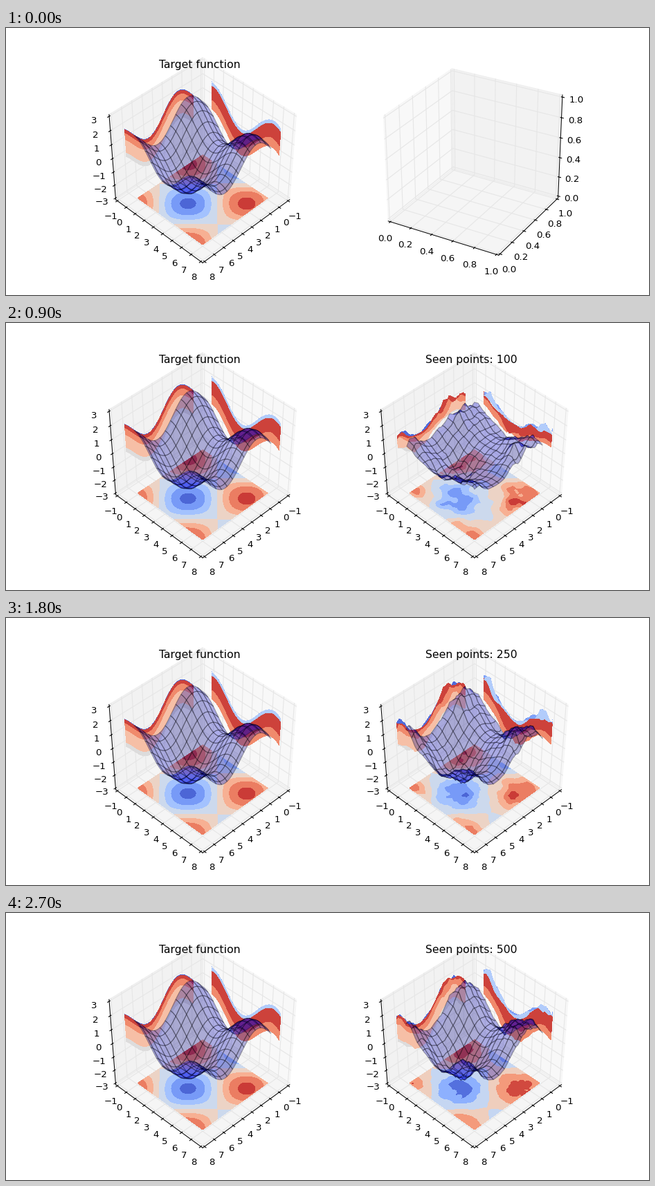
A matplotlib script for the animation above (3900 ms loop, 929 by 387 pixels).

```python
import numpy as np
import matplotlib.pyplot as plt
from matplotlib.animation import FuncAnimation
from matplotlib.collections import PolyCollection
from matplotlib.ticker import MaxNLocator

W, H, DPI = 929, 387, 80
plt.rcParams["font.family"] = "DejaVu Sans"
CMAP = plt.get_cmap("coolwarm")
LEVELS = MaxNLocator(7, steps=[1, 1.5, 2, 2.5, 3, 4, 5, 6, 8, 10])
ALPHA = 0.3
PAD = 0.5 + 1 / 48          # half size of the drawn box
DELTA = 1 / 12
AX_W, AX_H = W * 0.775 / 2.2, H * 0.8
COUNTS = [0, 50, 100, 150, 200, 250, 300, 400, 500]
SIDE, SIZE, STRIDE = 7, 100, 8

axis_pts = np.linspace(0, SIDE, SIZE)
X, Y = np.meshgrid(axis_pts, axis_pts)


class View:
    """Perspective view of a box, projected to stage pixels."""

    def __init__(self, column, lo, hi, ticks, fmt, elev, azim):
        self.left = W * 0.125 + column * AX_W * 1.2
        self.lo, self.hi = np.array(lo, float), np.array(hi, float)
        self.ticks, self.fmt = ticks, fmt
        e, a = np.radians([elev, azim])
        self.n = np.array([np.cos(e) * np.cos(a), np.cos(e) * np.sin(a), np.sin(e)])
        self.u = np.array([-np.sin(a), np.cos(a), 0])
        self.v = np.cross(self.n, self.u)

    def screen(self, q):
        q = np.asarray(q, float)
        depth = 10 - q @ self.n
        sx = self.left + (q @ self.u / depth + 0.095) / 0.185 * AX_W
        sy = H * 0.9 - (q @ self.v / depth + 0.095) / 0.185 * AX_H
        return sx, sy, depth

    def unit(self, x, y, z):
        p = np.stack(np.broadcast_arrays(x, y, z), axis=-1)
        return (p - self.lo) / (self.hi - self.lo) - 0.5

    def project(self, x, y, z):
        return self.screen(self.unit(x, y, z))


def space(lo, hi):
    return np.linspace(lo, hi, int(round(hi - lo)) + 1)


def main_view(column):
    ticks = [space(-1, 8), space(-1, 8), space(-3, 3)]
    return View(column, (-1, -1, -3), (8, 8, 3), ticks, "{:g}", 45, 45)


def empty_view():
    ticks = [np.linspace(0, 1, 6)] * 3
    return View(1, (0, 0, 0), (1, 1, 1), ticks, "{:.1f}", 30, -60)


def put(p, i, value):
    q = np.array(p, float)
    q[i] = value
    return q


def draw_box(ax, view):
    back = -np.sign(view.n) * PAD
    for i, gray in enumerate((0.95, 0.90, 0.925)):
        j, k = [m for m in range(3) if m != i]
        corners = []
        for a, b in ((-1, -1), (1, -1), (1, 1), (-1, 1)):
            corners.append(put(put(back, j, a * PAD), k, b * PAD))
        sx, sy, _ = view.screen(corners)
        ax.fill(sx, sy, fc=(gray,) * 3 + (0.5,), ec=(gray,) * 3 + (0.5,), lw=1, zorder=0)

    for i, (flip, tick_dir) in enumerate(((1, 1), (0, 0), (0, 0))):
        edge = put(back, flip, -back[flip])
        sx, sy, _ = view.screen([put(edge, i, -PAD), put(edge, i, PAD)])
        ax.plot(sx, sy, color="k", lw=0.9, zorder=1.5)
        out = np.sign(edge[tick_dir])
        for t in view.ticks[i]:
            pos = (t - view.lo[i]) / (view.hi[i] - view.lo[i]) - 0.5
            g = put(back, i, pos)
            j, k = (i - 2) % 3, (i - 1) % 3
            sx, sy, _ = view.screen([put(g, j, -back[j]), g, put(g, k, -back[k])])
            ax.plot(sx, sy, color="0.9", lw=1, zorder=1)

            p = put(edge, i, pos)
            ends = [put(p, tick_dir, p[tick_dir] + out * s * DELTA) for s in (-0.1, 0.2)]
            sx, sy, _ = view.screen(ends)
            ax.plot(sx, sy, color="k", lw=1, zorder=1.6)

            label = put(p + np.sign(p) * DELTA, i, pos)
            sx, sy, _ = view.screen(label)
            text = view.fmt.format(t + 0.0).replace("-", "\u2212")
            ax.text(sx, sy, text, size=12, ha="center", va="top", zorder=4)


def cell_ring(r, c):
    """Grid indices around one patch, counter-clockwise."""
    r1, c1 = min(r + STRIDE, SIZE - 1), min(c + STRIDE, SIZE - 1)
    ring = [(r, j) for j in range(c, c1)] + [(i, c1) for i in range(r, r1)]
    ring += [(r1, j) for j in range(c1, c, -1)] + [(i, c) for i in range(r1, r, -1)]
    return tuple(np.array(ring).T)


def draw_surface(ax, view, z):
    polys, normals, depths = [], [], []
    px, py, depth = view.project(X, Y, z)
    starts = range(0, SIZE - 1, STRIDE)
    for r in starts:
        for c in starts:
            at = cell_ring(r, c)
            polys.append(np.column_stack([px[at], py[at]]))
            depths.append(depth[at].mean())
            ring = np.column_stack([X[at], Y[at], z[at]])
            a, b, d = ring[0], ring[len(ring) // 3], ring[2 * len(ring) // 3]
            nv = np.cross(a - b, b - d)
            normals.append(nv / np.linalg.norm(nv))
    shade = np.array(normals) @ [-1, -1, 0.5]
    span = np.ptp(shade)
    level = (shade - shade.min()) / span if span > 1e-6 else 0 * shade
    colors = np.zeros((len(polys), 4))
    colors[:, 2] = 0.5 + 0.5 * level
    colors[:, 3] = ALPHA
    order = np.argsort(depths)[::-1]
    ax.add_collection(PolyCollection([polys[i] for i in order], facecolors=colors[order],
                                     edgecolors=(0, 0, 0, ALPHA), linewidths=1, zorder=3),
                      autolim=False)


def draw_contours(ax, view, z, floor, flat=False):
    def fill(x, y, h, values):
        sx, sy, _ = view.project(x, y, h)
        ax.contourf(sx, sy, values, locator=LEVELS, cmap=CMAP, zorder=2)

    fill(X, Y, -3, floor)
    if flat:
        for x, y, tone in ((axis_pts, -1, 0.79), (-1, axis_pts, 13 / 14)):
            sx, sy, _ = view.project(x, y, 0)
            ax.plot(sx, sy, color=CMAP(tone), lw=1.2, zorder=2)
    else:
        fill(-1, Y, z, X)
        fill(X, -1, z, Y)


def draw_title(ax, view, text):
    ax.text(view.left + AX_W / 2, H * 0.1 + 0.08 * AX_H - 5 * DPI / 72, text,
            size=14.1, ha="center", va="baseline", zorder=4)


def reset(ax):
    ax.clear()
    ax.set(xlim=(0, W), ylim=(H, 0))
    ax.axis("off")


def target(x, y):
    return np.sin(x) + np.cos(y)


def learn():
    """Noisy samples pull a surface towards the target with local tent kernels."""
    rng = np.random.default_rng(4)
    z = np.zeros_like(X)
    states = {0: z.copy()}
    width, rate, margin = 0.9, 0.5, 0.5
    for n in range(1, COUNTS[-1] + 1):
        p = (n * np.array([0.7548777, 0.5698403]) + rng.normal(0, 0.03, 2)) % 1
        x, y = np.clip(p * (SIDE + 2 * margin) - margin, 0, SIDE)
        r, c = (int(round(v / SIDE * (SIZE - 1))) for v in (y, x))
        error = target(x, y) + rng.normal(0, 0.08) - z[r, c]
        tent = np.clip(1 - abs(X - x) / width, 0, 1) * np.clip(1 - abs(Y - y) / width, 0, 1)
        z += rate * error * tent
        if n in COUNTS:
            states[n] = z.copy()
    return states


def trough(d):
    return np.clip(1 - abs(d) / 0.8, 0, 1)


STATES = learn()
START_FLOOR = -0.99 * (trough(X - 5.45) + trough(Y - 4.7))

fig = plt.figure(figsize=(W / DPI, H / DPI), dpi=DPI, facecolor="white")
left_ax = fig.add_axes([0, 0, 1, 1], label="left")
right_ax = fig.add_axes([0, 0, 1, 1], label="right")

reset(left_ax)
left_view, right_view = main_view(0), main_view(1)
goal = target(X, Y)
draw_box(left_ax, left_view)
draw_contours(left_ax, left_view, goal, goal)
draw_surface(left_ax, left_view, goal)
draw_title(left_ax, left_view, "Target function")


def update(i):
    reset(right_ax)
    if i == 0:
        draw_box(right_ax, empty_view())
        return []
    count = COUNTS[min(i, len(COUNTS)) - 1]
    z = STATES[count]
    draw_box(right_ax, right_view)
    draw_contours(right_ax, right_view, z, z if count else START_FLOOR, flat=count == 0)
    draw_surface(right_ax, right_view, z)
    draw_title(right_ax, right_view, f"Seen points: {count}")
    return []


anim = FuncAnimation(fig, update, frames=13, interval=300, init_func=lambda: update(0),
                     repeat=True, repeat_delay=0, blit=False)
plt.show()
```
